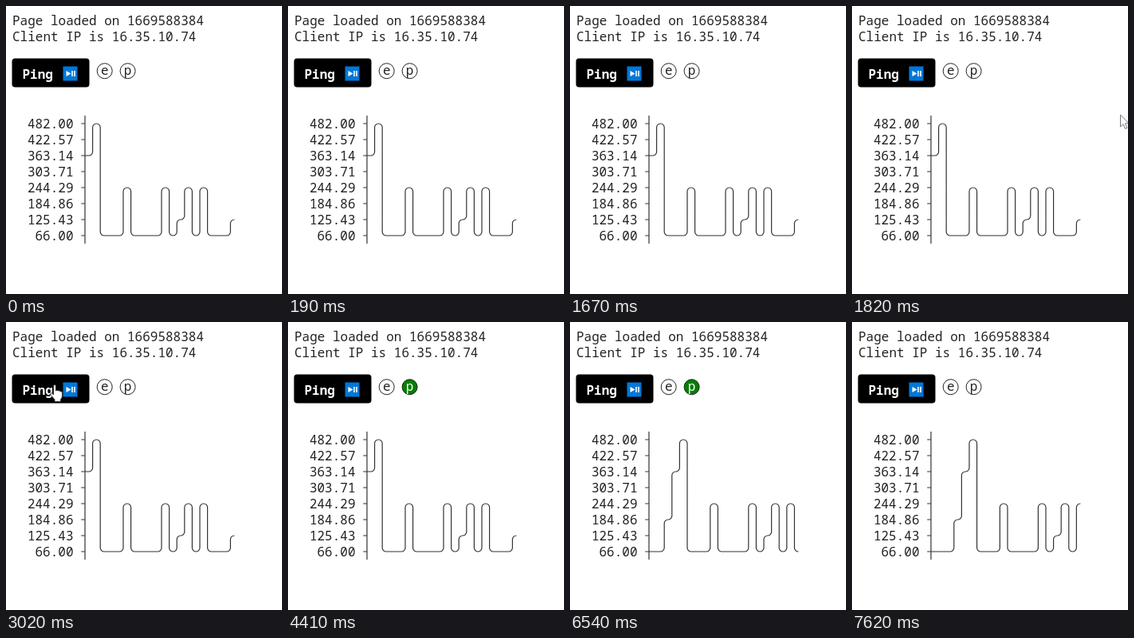
Write an HTML page that moves like this. It is 346 px wide and 360 px high and loops after 8000 ms.

```html
<!DOCTYPE html>
<html lang="en">
<head>
<meta charset="utf-8">
<title>Ping chart</title>
<style>
  html, body { margin: 0; width: 100%; height: 100%; overflow: hidden; background: #fff; }
  svg { display: block; width: 346px; height: 360px; }
  text { font: 16px "Noto Sans Mono", "DejaVu Sans Mono", monospace; fill: #222; }
  .bold { font-weight: 700; fill: #fff; }
  .line { fill: none; stroke: #333; stroke-width: 1.2; }
  .lamp circle { fill: #fff; stroke: #222; }
  .lamp text { text-anchor: middle; }
  .lamp.on circle { fill: #008000; }
  .lamp.on text { fill: #fff; }
  .cursor { fill: #fff; stroke-linejoin: round; }
</style>
</head>
<body>
<svg viewBox="0 0 346 360">
  <text x="8" y="24">Page loaded on 1669588384</text>
  <text x="8" y="44">Client IP is 16.35.10.74</text>

  <rect x="7.5" y="65.5" width="97" height="36" rx="4" fill="#000"/>
  <text class="bold" x="20.5" y="91">Ping</text>
  <rect x="71.5" y="75.5" width="18" height="18" fill="#0078d7"/>
  <path d="M75.5 81v7l6-3.5z" fill="#fff"/>
  <path d="M83 81v7M86 81v7" stroke="#fff" stroke-width="1.6"/>

  <g class="lamp"><circle cx="123.7" cy="81.2" r="9.5"/><text x="123.7" y="86">e</text></g>
  <g class="lamp" id="lamp"><circle cx="152.6" cy="81.2" r="9.5"/><text x="152.6" y="86">p</text></g>

  <g id="labels"></g>
  <path class="line" id="axis"/>
  <path class="line" id="plot"/>

  <path class="cursor" id="arrow" stroke="#777" d="M0 0V15L3.5 11.8L6 17.5L8.5 16.4L6 10.8H10.7Z"/>
  <path class="cursor" id="hand" stroke="#333" d="M-1.5 1.5Q0 -.5 1.5 1.5V8Q3 6.5 4.2 8Q5.700 7 6.8 8.7Q9 8 9.5 10.5V14Q9.5 17 7.5 19V21.5H0V19L-4.700 13.5Q-6 11.5 -4.5 10.8Q-3 10.5 -1.5 13Z"/>
  <rect id="tint" width="346" height="360" fill="rgb(108,163,221)" fill-opacity=".65"/>
</svg>
<script>
const LOOP = 8000, CELL = 9.6, ROW = 20, AXIS = 99, BASE = 287, END = 286.4;
const COUNT = 20, TOP = 7, LOW = 66, HIGH = 482;
const $ = id => document.getElementById(id);

// Chart rows of the samples that stand above the lowest row, newest first
const raised = { 0: 5, 1: 7, 5: 3, 10: 3, 12: 1, 13: 3, 15: 3, 19: 1 };
const samples = Array.from({ length: COUNT }, (_, i) => raised[i] || 0);

const REQUEST = 4410, FLASH = 90;
const replies = [4650, 5550, 6480, 7530];
const FIRST_REPLY = 2; // row of the first reply, later ones are on row 0

// Pointer moves: start, end, target
const ENTER = 1820, FRAME = 79;
const moves = [
  { from: ENTER, to: 2060, x: 241, y: 123 },
  { from: 2311, to: 3020, x: 61, y: 78 },
  { from: 3841, to: 3920, x: 65, y: 78 }
];

const rowY = row => BASE - ROW * row;
const ease = p => p * p * (3 - 2 * p);

function plotPath(rows) {
  const r = CELL / 2;
  let d = `M${AXIS} ${rowY(rows[0])}`;
  for (let i = 1; i < rows.length; i++) {
    if (rows[i] === rows[i - 1]) continue;
    const x = AXIS + CELL * i, y0 = rowY(rows[i - 1]), y1 = rowY(rows[i]);
    const dir = Math.sign(y1 - y0), sweep = dir > 0 ? 1 : 0;
    d += `H${x - r}A${r} ${r} 0 0 ${sweep} ${x} ${y0 + dir * r}` +
         `V${y1 - dir * r}A${r} ${r} 0 0 ${1 - sweep} ${x + r} ${y1}`;
  }
  return d + `H${END}`;
}

function drawAxis() {
  let d = `M${AXIS} ${rowY(TOP) - ROW / 2}V${BASE + ROW / 2}`;
  for (let row = 0; row <= TOP; row++) {
    const label = document.createElementNS("http://www.w3.org/2000/svg", "text");
    label.textContent = (LOW + (HIGH - LOW) * row / TOP).toFixed(2);
    label.setAttribute("x", 84.5);
    label.setAttribute("y", rowY(row) + 6);
    label.setAttribute("text-anchor", "end");
    $("labels").append(label);
    d += `M${AXIS - CELL / 2} ${rowY(row)}H${AXIS}`;
  }
  $("axis").setAttribute("d", d);
}

function pointerAt(t) {
  let x = 336.5, y = 136;
  for (const { from, to, x: tx, y: ty } of moves) {
    if (t < from) break;
    const frames = Math.round((to - from) / FRAME);
    const p = ease(Math.min(1, Math.floor((t - from) / (to - from) * frames) / frames));
    x += (tx - x) * p;
    y += (ty - y) * p;
  }
  return { x, y };
}

function show(node, visible) {
  node.style.display = visible ? "" : "none";
}

function draw(t) {
  const fresh = replies.filter(time => time <= t).map((_, i) => i ? 0 : FIRST_REPLY).reverse();
  $("plot").setAttribute("d", plotPath([...fresh, ...samples].slice(0, COUNT)));
  $("lamp").classList.toggle("on", [REQUEST, ...replies].some(time => t >= time && t < time + FLASH));
  show($("tint"), t >= 1600 && t < 1670);

  const { x, y } = pointerAt(t);
  const visible = t >= ENTER && t < REQUEST;
  const overButton = x < 104 && y < 101;
  for (const id of ["arrow", "hand"]) {
    $(id).setAttribute("transform", `translate(${x} ${y})`);
    show($(id), visible && overButton === (id === "hand"));
  }
}

drawAxis();
const began = performance.now();
function tick() {
  draw((performance.now() - began) % LOOP);
  requestAnimationFrame(tick);
}
tick();
</script>
</body>
</html>
```
